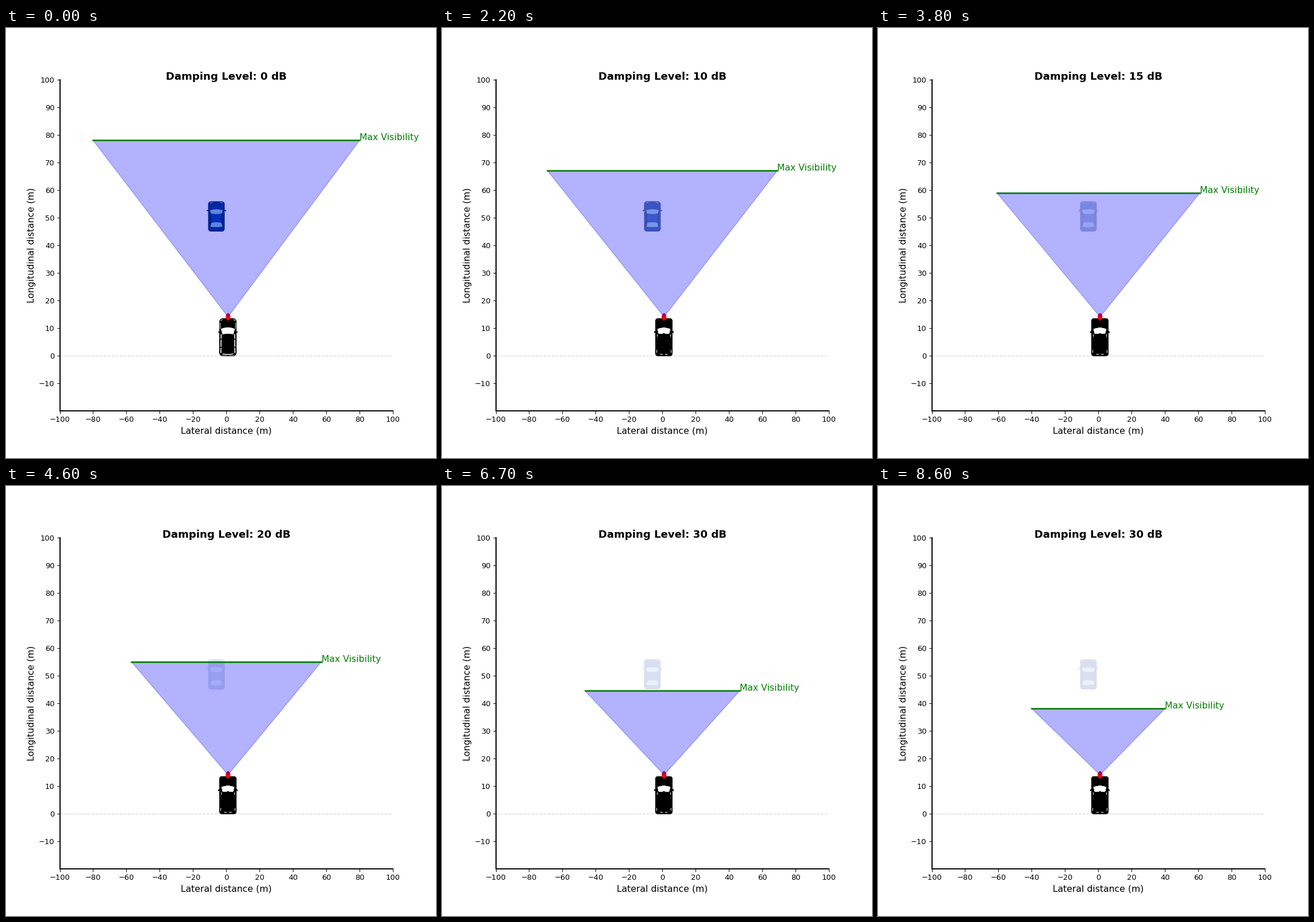
A matplotlib script that plays this animation: 748x748 px, repeating every 9 s.

```python
import numpy as np
import matplotlib.pyplot as plt
from matplotlib.animation import FuncAnimation
from matplotlib.patches import Circle, Polygon

SIZE = 748
FRAMES, STEPS = 90, 80
SS = 8  # supersampling of the car sprites

fig = plt.figure(figsize=(8, 8), dpi=SIZE / 8, facecolor="white")
ax = fig.add_subplot()


def setup_axes():
    ax.set(xlim=(-100, 100), ylim=(-20, 100))
    ax.set_xticks(range(-100, 101, 20))
    ax.set_yticks(range(-10, 101, 10))
    ax.set_xlabel("Lateral distance (m)", fontsize=12)
    ax.set_ylabel("Longitudinal distance (m)", fontsize=12)
    for side in ("top", "right"):
        ax.spines[side].set_visible(False)
    for side in ("left", "bottom"):
        ax.spines[side].set_linewidth(1.5)
    ax.axhline(0, color="gray", ls="--", lw=1, alpha=0.3, zorder=1)


def rounded(u, v, half, top, bottom, r):
    """Mask of a rounded box, mirrored about u = 0."""
    du = np.maximum(u - (half - r), 0)
    dv = np.maximum(abs(v - (top + bottom) / 2) - ((bottom - top) / 2 - r), 0)
    return np.hypot(du, dv) <= r


def between(x, low, high):
    return (x >= low) & (x <= high)


def sprite(box, center, top, paint):
    """Rasterise a mirrored car; paint yields (mask, rgba) from back to front."""
    x0, y0, x1, y1 = box
    x = np.arange((x1 - x0) * SS) / SS + x0 + 0.5 / SS
    y = np.arange((y1 - y0) * SS) / SS + y0 + 0.5 / SS
    u, v = np.meshgrid(abs(x - center), y - top)
    canvas = np.zeros(u.shape + (4,))
    for mask, rgba in paint(u, v):
        canvas[mask] = rgba
    canvas[..., :3] *= canvas[..., 3:]
    out = canvas.reshape(y1 - y0, SS, x1 - x0, SS, 4).mean(axis=(1, 3))
    out[..., :3] /= np.maximum(out[..., 3:], 1e-6)
    return np.clip(out, 0, 1)


def rgb(r, g, b, a=1.0):
    return r / 255, g / 255, b / 255, a


def blue_car(u, v):
    dark, body, roof = rgb(0, 22, 128), rgb(0, 40, 165), rgb(0, 48, 182)
    glass = rgb(40, 106, 205, 0.6)
    yield between(u, 13, 17) & (abs(v - 16 - 0.3 * (u - 14)) < 0.9), dark
    yield rounded(u, v, 14.4, 0.5, 53, 5), dark
    yield rounded(u, v, 13.2, 1.6, 51.8, 4.5), body
    yield between(u, 6.5, 11.5) & (abs(v - 2.4 - 0.03 * (u - 6) ** 2) < 0.7), rgb(105, 115, 175)
    yield (u < 11) & between(v, 15, 46), dark
    yield (u < 9.2) & between(v, 22, 38.5), roof
    yield (between(v, 14.3 + 0.014 * u**2, 22.6 - 0.012 * u**2)
           & (u < 11.3 - 0.28 * (v - 15.5))), glass
    yield (between(v, 37 + 0.012 * u**2, 45.4 - 0.006 * u**2)
           & (u < 8.6 + 0.26 * (v - 37.5))), glass


def black_car(u, v):
    ink, gap = rgb(0, 0, 0), rgb(0, 0, 0, 0)
    yield between(u, 13, 17) & (abs(v - 24 - 0.3 * (u - 14.5)) < 1), ink
    yield rounded(u, v, 15, 0.5, 66.4, 6), ink
    # lamps and fender lines
    yield between(u, 9.5, 13) & (abs(v - 2.8 - 0.2 * (u - 9.5) ** 2) < 0.6), gap
    yield (abs(u - 13.3) < 0.4) & between(v, 8, 19), gap
    # windscreen
    yield (between(v, 16.3 + 0.018 * u**2, 27.4 + 0.012 * u**2)
           & (u < 12.4 - 0.28 * (v - 18))), gap
    # side windows with pillars
    yield ((abs(u - 12 - 0.012 * (v - 44)) < 0.8) & between(v, 28, 61)
           & (abs(v - 37) > 0.9) & (abs(v - 51) > 0.9)), gap
    # rear window and bumper
    yield (u < 9.5) & between(v, 62.6 - 0.012 * u**2, 64 - 0.012 * u**2), gap
    yield between(u, 2, 11) & between(v, 64.9, 65.5), gap


def place(img, box, zorder):
    x0, y0, x1, y1 = box
    (left, low), (right, high) = ax.transData.inverted().transform(
        [(x0, SIZE - y1), (x1, SIZE - y0)])
    return ax.imshow(img, extent=(left, right, low, high), aspect="auto",
                     interpolation="nearest", zorder=zorder)


setup_axes()
EGO_BOX, LEAD_BOX = (366, 502, 406, 574), (346, 299, 386, 357)
ego_img = sprite(EGO_BOX, 386, 504.5, black_car)
ego = place(ego_img, EGO_BOX, 2)
lead = place(sprite(LEAD_BOX, 366, 301, blue_car), LEAD_BOX, 5)
ax.set(xlim=(-100, 100), ylim=(-20, 100))

ax.add_patch(Circle((1, 14), 1.2, color="red", zorder=3))
cone = ax.add_patch(Polygon([(-80, 78), (80, 78), (1, 14)],
                            color="blue", alpha=0.3, zorder=4))
limit, = ax.plot([], [], color="green", lw=2, zorder=6)
label = ax.text(80, 78, "Max Visibility", color="green", fontsize=12, zorder=7)
title = ax.set_title("", fontsize=14, fontweight="bold", y=1, pad=0)


def update(i):
    k = min(i, STEPS)
    half, reach = 80 - k / 2, 78 - k / 2
    cone.set_xy([(-half, reach), (half, reach), (1, 14)])
    limit.set_data([-half, half], [reach, reach])
    label.set_position((half, reach))
    title.set_text(f"Damping Level: {min(k // 10, 6) * 5} dB")
    lead.set_alpha(np.interp(k, [8, 45], [1, 0.15]))
    # soft edges of the near car build up with every pass
    img = ego_img.copy()
    img[..., 3] = 1 - (1 - img[..., 3]) ** (i + 1)
    ego.set_data(img)
    return cone, limit, label, title, lead, ego


anim = FuncAnimation(fig, update, frames=FRAMES, interval=100,
                     repeat=True, repeat_delay=0, blit=False)
plt.show()
```
